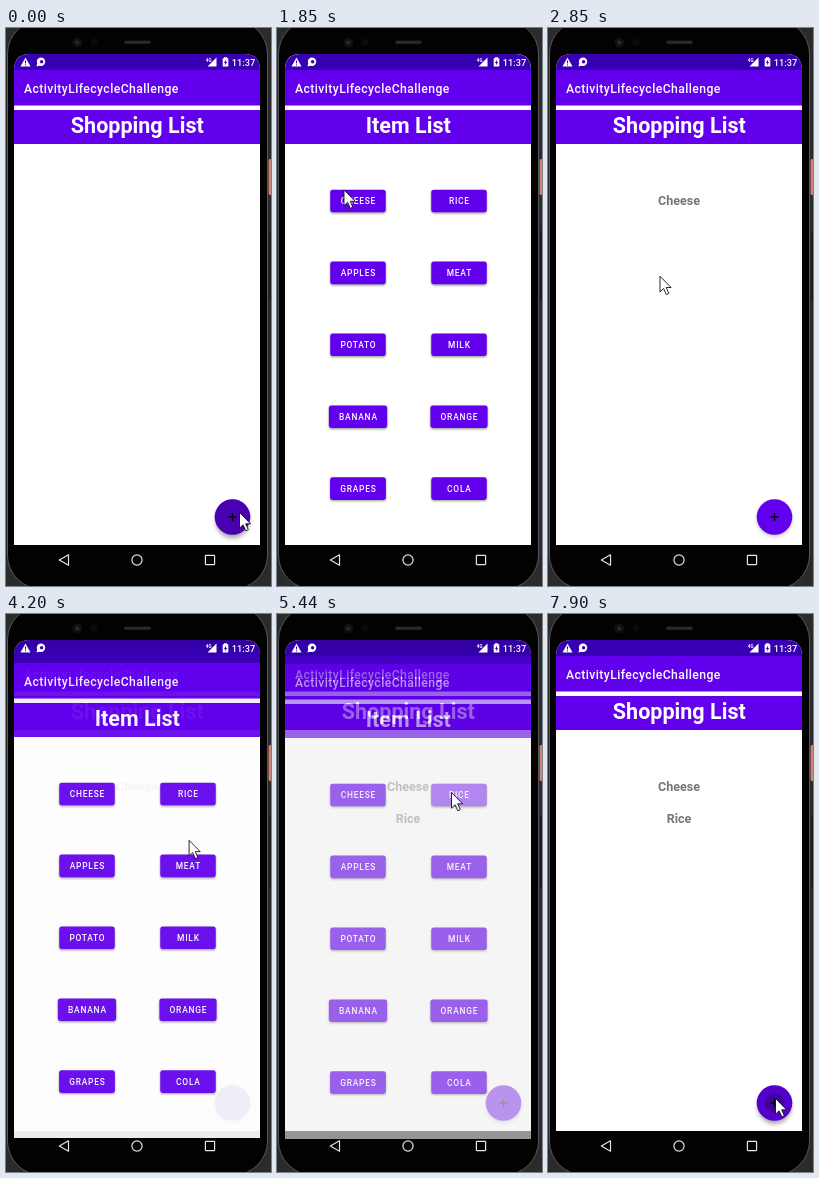
An HTML page that plays this animation: 265x558 px, repeating every 8 s.

```html
<!DOCTYPE html>
<html lang="en">
<head>
<meta charset="utf-8">
<title>Shopping list</title>
<style>
  html, body { margin: 0; width: 100%; height: 100%; overflow: hidden; background: #2b2b2c; }
  svg { display: block; width: 265px; height: 558px; font-family: Roboto, sans-serif; }
  .bar { fill: #6200ee; }
  .app { font-size: 12.2px; font-weight: 500; letter-spacing: .42px; fill: #fff; }
  .heading { font-size: 21.55px; font-weight: 700; fill: #fff; text-anchor: middle; }
  .entry { font-size: 12.5px; font-weight: 700; fill: #757575; text-anchor: middle; }
  .label { font-size: 8.4px; font-weight: 500; letter-spacing: .78px; fill: #fff; text-anchor: middle; }
  .clock { font-size: 9.2px; font-weight: 500; fill: #fff; }
</style>
</head>
<body>
<svg viewBox="0 0 265 558">
  <defs>
    <clipPath id="screen"><path d="M8 546V42Q8 26 24 26H238Q254 26 254 42V546Z"/></clipPath>
    <filter id="soft" x="-50%" y="-50%" width="200%" height="200%"><feGaussianBlur stdDeviation="2.2"/></filter>
    <filter id="fine" x="-20%" y="-20%" width="140%" height="150%"><feGaussianBlur stdDeviation=".8"/></filter>
    <g id="chrome">
      <path fill="#fff" d="M8 26H254V517H8Z"/>
      <path fill="#3700b3" d="M8 26H254V42H8Z"/>
      <path class="bar" d="M8 42H254V77.6H8ZM8 82H254V116H8Z"/>
      <text class="app" x="18" y="64.5">ActivityLifecycleChallenge</text>
    </g>
  </defs>

  <!-- device -->
  <rect x="262.6" y="131" width="4" height="36" rx="1.5" fill="#d08574"/>
  <rect x="263" y="203" width="3" height="70" fill="#1d1d1f"/>
  <rect x="1.5" y="-8" width="260" height="569" rx="34" fill="#020202" stroke="#565658"/>
  <circle cx="71.3" cy="14.6" r="5" fill="#101012"/>
  <circle cx="71.3" cy="14.6" r="2.2" fill="#26272b"/>
  <circle cx="88" cy="14" r="3.5" fill="#0b0b0c"/>
  <rect x="118" y="12.5" width="27" height="3.5" rx="1.7" fill="#202022"/>
  <path d="M120 14.2H144" stroke="#444446" stroke-dasharray="1 1"/>

  <g clip-path="url(#screen)">
    <use href="#chrome"/>
    <text class="heading" x="131.3" y="105.2">Shopping List</text>
    <text class="entry" id="cheese" x="131" y="176.5">Cheese</text>
    <text class="entry" id="rice" x="131" y="208.5">Rice</text>
    <circle id="shadow" cx="226.5" r="17" filter="url(#soft)"/>
    <circle class="bar" cx="226.5" cy="489" r="17.8"/>
    <circle id="shade" cx="226.5" cy="489" r="17.8"/>
    <circle id="ripple" cx="226.5" cy="489"/>
    <path d="M222.5 489H230.5M226.5 485V493" stroke="#000" stroke-width="1.3"/>
    <path id="dim" d="M8 26H254V517H8Z" opacity=".09"/>
    <g id="items">
      <use href="#chrome"/>
      <text class="heading" x="131.3" y="105.2">Item List</text>
    </g>
  </g>

  <!-- status and navigation -->
  <path fill="#fff" d="M19.5 29.5L24.5 38.5H14.5Z"/>
  <path stroke="#3700b3" d="M19.5 32.5V35.4M19.5 36.3V37.4"/>
  <circle cx="35" cy="33.8" r="4.2" fill="#fff"/>
  <circle cx="35.6" cy="33.8" r="1.7" fill="#3700b3"/>
  <path fill="#fff" d="M30.5 38.5L31.3 35L34 37.6Z"/>
  <path fill="#fff" d="M210.5 29.5V38.5H201.5Z"/>
  <text x="199.8" y="33.5" font-size="4.5" font-weight="700" fill="#fff">4G</text>
  <path fill="#fff" d="M218 29.3H221V30.2H222.3V38.6H216.7V30.2H218Z"/>
  <path fill="#3700b3" d="M220.2 31.5L217.9 35H219.2L218.8 37.5L221.2 34H219.9Z"/>
  <text class="clock" x="225.8" y="37.5">11:37</text>
  <g fill="none" stroke="#e4e4e4" stroke-width="1.2">
    <path stroke-linejoin="round" d="M62.5 526.8V537.2L53.3 532Z"/>
    <circle cx="131" cy="532" r="5.1"/>
    <rect x="199.4" y="527.4" width="9.2" height="9.2" rx=".5"/>
  </g>

  <path id="cursor" fill="#fff" stroke="#111" stroke-width=".9" stroke-linejoin="round"
        d="M.5 .5V16.2L4.1 12.8L6.8 18.8L9.3 17.7L6.7 11.8H11.6Z"/>
</svg>

<script>
const LOOP = 8000, STEP = 125, PHASE = 27;
const $ = id => document.getElementById(id);
const set = (id, attrs) => { for (const k in attrs) $(id).setAttribute(k, attrs[k]); };
const show = (id, on) => set(id, { visibility: on ? 'visible' : 'hidden' });
const clamp = v => Math.max(0, Math.min(1, v));
const smooth = u => u * u * (3 - 2 * u);

const svgNode = (tag, attrs) => {
  const node = document.createElementNS('http://www.w3.org/2000/svg', tag);
  for (const k in attrs) node.setAttribute(k, attrs[k]);
  return $('items').appendChild(node);
};

function addButton(name, i) {
  const x = i % 2 ? 182 : 81, y = 173 + 71.9 * Math.floor(i / 2);
  const text = svgNode('text', { class: 'label', x: x + .4, y: y + 3 });
  text.textContent = name;
  const width = Math.max(55.5, text.getComputedTextLength() + 19.5);
  const box = { x: x - width / 2, y: y - 11.3, width, height: 22.6, rx: 2.4 };
  svgNode('rect', { ...box, y: box.y + 1.2, opacity: .4, filter: 'url(#fine)' });
  svgNode('rect', { ...box, class: 'bar' });
  svgNode('rect', { ...box, id: 'tap' + name, fill: '#fff', opacity: 0 });
  $('items').append(text);
}
['CHEESE', 'RICE', 'APPLES', 'MEAT', 'POTATO', 'MILK', 'BANANA', 'ORANGE', 'GRAPES', 'COLA'].forEach(addButton);

const visits = [
  { item: 'CHEESE', entry: 'cheese', open: 1, tap: 20, close: 21 },
  { item: 'RICE', entry: 'rice', open: 33, tap: 41, close: 43 },
];
const presses = [
  { down: -3, up: 0 }, { down: 31, up: 33 }, { down: 51, up: 54 }, { down: 62, up: 64 },
];
const home = { x: 233, y: 484 };
const moves = [
  { from: 1, to: 7, x: 69, y: 178 },
  { from: 14, to: 15, x: 66.5, y: 161.5 },
  { from: 22, to: 25, x: 240, y: 494 },
  { from: 25, to: 28, x: 229, y: 484 },
  { from: 31.2, to: 33.6, x: 174, y: 178 },
  { from: 43, to: 44.4, x: 218, y: 484 },
  { from: 52, to: 53.9, x: 179, y: 382 },
  { from: 56, to: 59, x: 227, y: 484 },
];

function pointerAt(n) {
  let { x, y } = home;
  for (const m of moves) {
    const k = smooth(clamp((n - m.from) / (m.to - m.from)));
    x += (m.x - x) * k;
    y += (m.y - y) * k;
  }
  return `translate(${x} ${y})`;
}

function itemScreenAt(n) {
  const visit = visits.find(v => n >= v.open && n <= v.close);
  if (!visit) return { alpha: 0, drop: 0 };
  if (n === visit.close) return { alpha: .58, drop: 8 };
  const drop = 7 * .07 ** (n - visit.open);
  return { alpha: 1 - drop / 100, drop };
}

function pressAt(n) {
  const press = presses.findLast(p => n >= p.down);
  if (!press) return { spread: 0, strength: 0 };
  const spread = clamp((n - press.down + 1) / 3);
  const fade = clamp(1 - (n - press.up + 1) / 4);
  return { spread, strength: n < press.up ? 1 : fade };
}

function draw(time) {
  const n = Math.floor((time + PHASE) / STEP) % (LOOP / STEP);
  const { alpha, drop } = itemScreenAt(n);
  const { spread, strength } = pressAt(n);
  const force = spread * strength;

  set('cursor', { transform: pointerAt(n) });
  set('items', { opacity: alpha, transform: `translate(0 ${drop})` });
  show('dim', alpha > 0 && alpha < 1);
  set('shadow', { cy: 491 + 3 * force, opacity: .3 + .05 * force });
  set('shade', { opacity: .22 * force });
  set('ripple', { r: 17.8 * spread ** 1.4, opacity: .25 * (1.6 - spread) * strength });
  for (const v of visits) {
    show(v.entry, n >= v.close);
    set('tap' + v.item, { opacity: n <= v.close ? .25 * clamp((n - v.tap + 1) / 2) : 0 });
  }
}

const start = performance.now();
function frame() {
  draw((performance.now() - start) % LOOP);
  requestAnimationFrame(frame);
}
frame();
</script>
</body>
</html>
```
